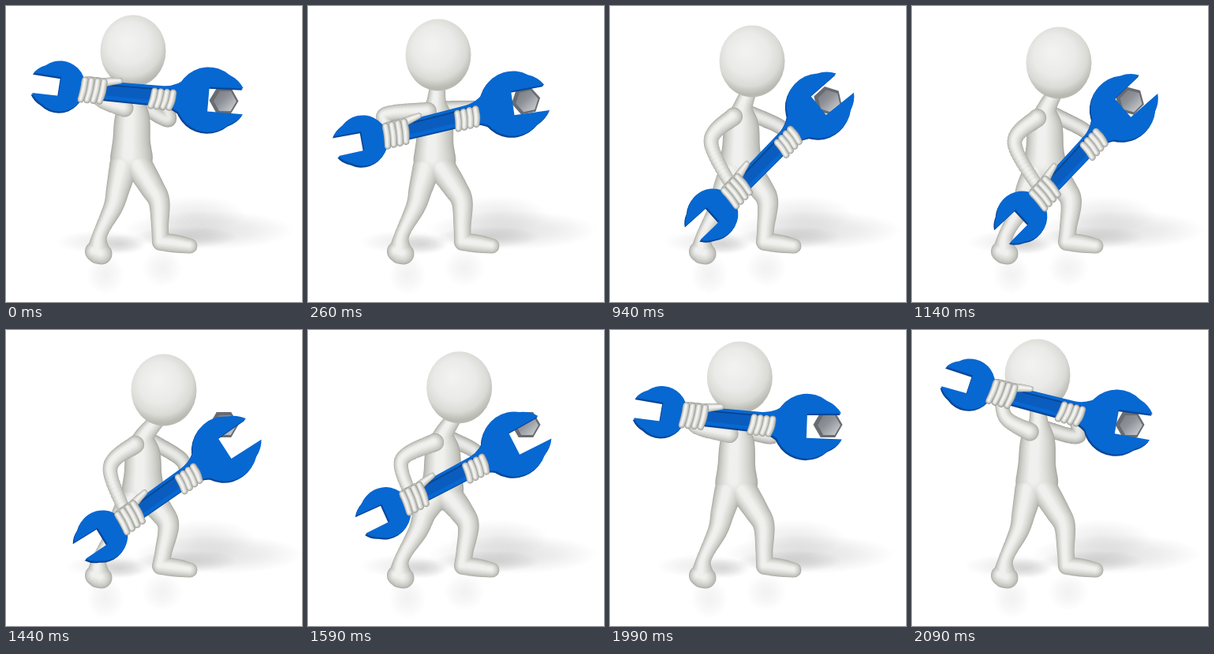
Animation of 375 by 375 pixels, one loop 2.19 s. Source, as an HTML page with a canvas:

```html
<!DOCTYPE html>
<html lang="en">
<head>
<meta charset="utf-8">
<title>Figure turning a bolt</title>
<style>
html, body { margin: 0; width: 100%; height: 100%; overflow: hidden; background: #fff; }
canvas { display: block; width: 375px; height: 375px; }
</style>
</head>
<body>
<canvas id="stage" width="375" height="375"></canvas>
<script>
const ctx = document.getElementById('stage').getContext('2d');
const LOOP = 2190;
const STEPS = [0, 130, 260, 410, 560, 740, 940, 1140, 1290, 1440, 1590, 1690, 1790, 1890, 1990, 2090];

// step, small jaw x y, big jaw x y, big jaw tilt, head x y, left elbow x y, right elbow x y
const KEYS = [
  [0, 68, 102, 256, 119, -4, 161, 53, 122, 120, 206, 144],
  [2, 69, 171, 259, 124, 2, 165, 58, 97, 138, 214, 130],
  [4, 91, 225, 261, 127, 1, 170, 62, 105, 152, 213, 140],
  [6, 130, 264, 264, 127, 3, 180, 66, 128, 172, 217, 154],
  [7, 139, 267, 267, 130, 2, 186, 68, 130, 174, 219, 158],
  [8, 138, 264, 274, 139, 0, 193, 70, 131, 175, 221, 161],
  [9, 122, 261, 277, 151, -1, 200, 72, 132, 175, 222, 164],
  [12, 50, 173, 229, 133, -6, 175, 62, 92, 146, 194, 136],
  [15, 73, 69, 259, 117, -8, 159, 53, 119, 111, 211, 134]
];
KEYS.push([16, ...KEYS[0].slice(1)]);

const mix = (a, b, t) => a + (b - a) * t;
const rad = d => d * Math.PI / 180;

function poseAt(step) {
  let i = 0;
  while (KEYS[i + 1][0] <= step) i++;
  const [a, b] = [KEYS[i], KEYS[i + 1]];
  const t = (step - a[0]) / (b[0] - a[0]);
  return a.map((v, j) => mix(v, b[j], t));
}

function spline(a, b, c, d, t) {
  return b + t / 2 * (c - a + t * (2 * a - 5 * b + 4 * c - d + t * (3 * (b - c) + d - a)));
}

// Expands [x, y, r] joints into a smooth row of discs.
function tube(...joints) {
  const discs = [];
  const at = i => joints[Math.max(0, Math.min(joints.length - 1, i))];
  for (let i = 0; i < joints.length - 1; i++) {
    for (let s = 0; s <= 16; s++) {
      discs.push([0, 1, 2].map(k => spline(at(i - 1)[k], at(i)[k], at(i + 1)[k], at(i + 2)[k], s / 16)));
    }
  }
  return discs;
}

// Paints joined tubes as one softly lit volume.
function paint(tubes, edge = 172, light = 240, layers = 14) {
  for (let k = 0; k < layers; k++) {
    const q = k / (layers - 1);
    const v = Math.round(mix(edge, light, Math.pow(q, 0.6)));
    ctx.fillStyle = `rgb(${v},${v},${v - Math.round(6 - 4 * q)})`;
    ctx.beginPath();
    for (const [x, y, r] of tubes.flat()) {
      const size = r * (1 - 0.78 * q);
      const px = x - r * 0.16 * q, py = y - r * 0.12 * q;
      ctx.moveTo(px + size, py);
      ctx.arc(px, py, size, 0, 7);
    }
    ctx.fill();
  }
}

function soft(x, y, rx, ry, alpha) {
  ctx.save();
  ctx.translate(x, y);
  ctx.scale(rx, ry);
  const g = ctx.createRadialGradient(0, 0, 0, 0, 0, 1);
  g.addColorStop(0, `rgba(110,110,110,${alpha})`);
  g.addColorStop(0.5, `rgba(110,110,110,${alpha * 0.6})`);
  g.addColorStop(1, 'rgba(110,110,110,0)');
  ctx.fillStyle = g;
  ctx.beginPath();
  ctx.arc(0, 0, 1, 0, 7);
  ctx.fill();
  ctx.restore();
}

function floor(jawX) {
  const dx = (jawX - 258) * 0.6;
  soft(258 + dx, 284, 108, 25, 0.2);
  soft(240 + dx, 264, 64, 24, 0.13);
  soft(228, 293, 66, 14, 0.24);
  soft(122 + dx, 299, 58, 15, 0.13);
  soft(144, 302, 34, 13, 0.22);
  soft(126, 340, 24, 26, 0.09);
  soft(198, 332, 26, 24, 0.09);
}

function polygon(points, fill) {
  ctx.beginPath();
  points.forEach(p => ctx.lineTo(...p));
  ctx.closePath();
  ctx.fillStyle = fill;
  ctx.fill();
}

function bolt(angle) {
  const hex = (x, y, r) => [0, 1, 2, 3, 4, 5].map(i => {
    const a = angle + i * Math.PI / 3;
    return [x + r * Math.cos(a), y + r * Math.sin(a)];
  });
  polygon(hex(276, 120, 18.5), '#686c71');
  const g = ctx.createLinearGradient(264, 106, 290, 134);
  g.addColorStop(0, '#74787e');
  g.addColorStop(0.45, '#8f9399');
  g.addColorStop(1, '#d2d4d6');
  polygon(hex(277.5, 120.5, 14.5), g);
}

function jawPath() {
  ctx.beginPath();
  ctx.moveTo(1, -16);
  ctx.lineTo(44, -15);
  ctx.quadraticCurveTo(38, -26, 26.4, -31.4);
  ctx.arc(0, 0, 41, rad(-50), rad(50), true);
  ctx.quadraticCurveTo(38, 27, 44, 18);
  ctx.lineTo(-1, 15);
  ctx.closePath();
}

function handlePath(len) {
  ctx.beginPath();
  ctx.moveTo(14, -20);
  ctx.quadraticCurveTo(32, -11, 46, -11);
  ctx.lineTo(len - 58, -12);
  ctx.quadraticCurveTo(len - 40, -13, len - 26, -28);
  ctx.lineTo(len - 14, 0);
  ctx.lineTo(len - 26, 28);
  ctx.quadraticCurveTo(len - 40, 13, len - 58, 12);
  ctx.lineTo(46, 11);
  ctx.quadraticCurveTo(32, 11, 14, 20);
  ctx.closePath();
}

function wrench(x, y, angle, len, tilt) {
  const pass = (dx, dy, fill) => {
    const part = (u, turn, scale, path) => {
      ctx.save();
      ctx.translate(x + dx, y + dy);
      ctx.rotate(angle);
      ctx.translate(u, 0);
      ctx.rotate(turn);
      ctx.scale(scale, scale);
      path();
      ctx.fillStyle = fill;
      ctx.fill();
      ctx.restore();
    };
    part(0, Math.PI, 0.78, jawPath);
    part(len, tilt, 1, jawPath);
    part(0, 0, 1, () => handlePath(len));
  };
  pass(-1.2, 1.8, '#083f8c');
  pass(-0.4, 0.6, '#0852ad');
  pass(0.4, -0.6, '#0768d2');

  ctx.save();
  ctx.translate(x, y);
  ctx.rotate(angle);
  polygon([[38, -7], [len - 48, -8], [len - 42, 0], [len - 48, 7], [38, 6]], '#0a5dbf');
  ctx.lineWidth = 1.8;
  ctx.strokeStyle = '#07458f';
  ctx.beginPath();
  ctx.moveTo(38, -7);
  ctx.lineTo(len - 48, -8);
  ctx.stroke();
  ctx.restore();
}

function fingers(u, v, half, gap) {
  for (let i = 0; i < 4; i++) {
    const c = u + (i - 1.5) * gap;
    paint([tube([c + 2, v - half, 4.4], [c + 1, v, 4.7], [c - 1.5, v + half - 1, 4.1])], 150, 243, 7);
  }
}

function draw(step) {
  const [, lx, ly, rx, ry, tilt, hx, hy, elx, ely, erx, ery] = poseAt(step);
  const angle = Math.atan2(ry - ly, rx - lx);
  const len = Math.hypot(rx - lx, ry - ly);
  const along = t => [mix(lx, rx, t), mix(ly, ry, t)];
  const lean = hx - 161, drop = hy - 53;
  const chest = [160 + lean * 0.35, 138 + drop * 0.85];
  const hip = [159 + lean * 0.37, 192 + drop * 0.6];
  const shin = lean * 0.3;

  ctx.clearRect(0, 0, 375, 375);
  floor(rx);
  bolt(step < 8 ? angle + rad(tilt) : 0);

  paint([tube([chest[0] + 13, chest[1] - 12, 10], [erx, ery, 9.5], [...along(0.69), 8])], 160, 232);
  paint([
    tube([hx - lean * 0.25, hy + 44, 10], [chest[0] + 1, chest[1] - 18, 13],
      [chest[0], chest[1] + 4, 22], [hip[0], hip[1] - 20, 24], [hip[0], hip[1], 27]),
    tube([hip[0] - 10, hip[1] + 10, 18], [142 + lean * 0.2, 231, 15],
      [136 + lean * 0.12, 254, 12.5], [119, 290, 9.5], [117, 312, 15]),
    tube([hip[0] + 9, hip[1] + 10, 18], [185 + shin, 230, 15.5],
      [194 + shin, 248, 13.5], [195 + shin * 0.4, 280, 11], [196, 299, 11]),
    tube([196, 299, 11], [214, 301, 11.5], [233, 304, 9.5]),
    tube([113, 311, 13], [121, 314, 13.5])
  ]);

  const g = ctx.createRadialGradient(hx - 8, hy - 9, 4, hx - 3, hy - 3, 49);
  g.addColorStop(0, '#f2f2f0');
  g.addColorStop(0.5, '#eaeae8');
  g.addColorStop(0.8, '#dadad6');
  g.addColorStop(1, '#b9b9b2');
  ctx.fillStyle = g;
  ctx.beginPath();
  ctx.ellipse(hx, hy + 4, 41.5, 45.5, 0, 0, 7);
  ctx.fill();

  paint([tube([chest[0] - 10, chest[1] - 9, 11.5], [elx, ely, 9.5], [...along(0.21), 8])]);
  wrench(lx, ly, angle, len, rad(tilt));

  ctx.save();
  ctx.translate(lx, ly);
  ctx.rotate(angle);
  const grip = len * 0.22;
  paint([
    tube([grip - 7, -8, 8], [grip + 8, -8, 8]),
    tube([grip + 8, -9, 6], [grip + 22, -12, 5], [grip + 34, -14, 3.5])
  ], 165, 242, 9);
  fingers(grip, 2, 13, 8);
  fingers(len * 0.69, 5, 10, 7.8);
  ctx.restore();
}

const start = performance.now();
let shown = -1;
function tick() {
  const t = (performance.now() - start) % LOOP;
  let step = STEPS.length - 1;
  while (STEPS[step] > t) step--;
  if (step !== shown) draw(shown = step);
  requestAnimationFrame(tick);
}
tick();
</script>
</body>
</html>
```
